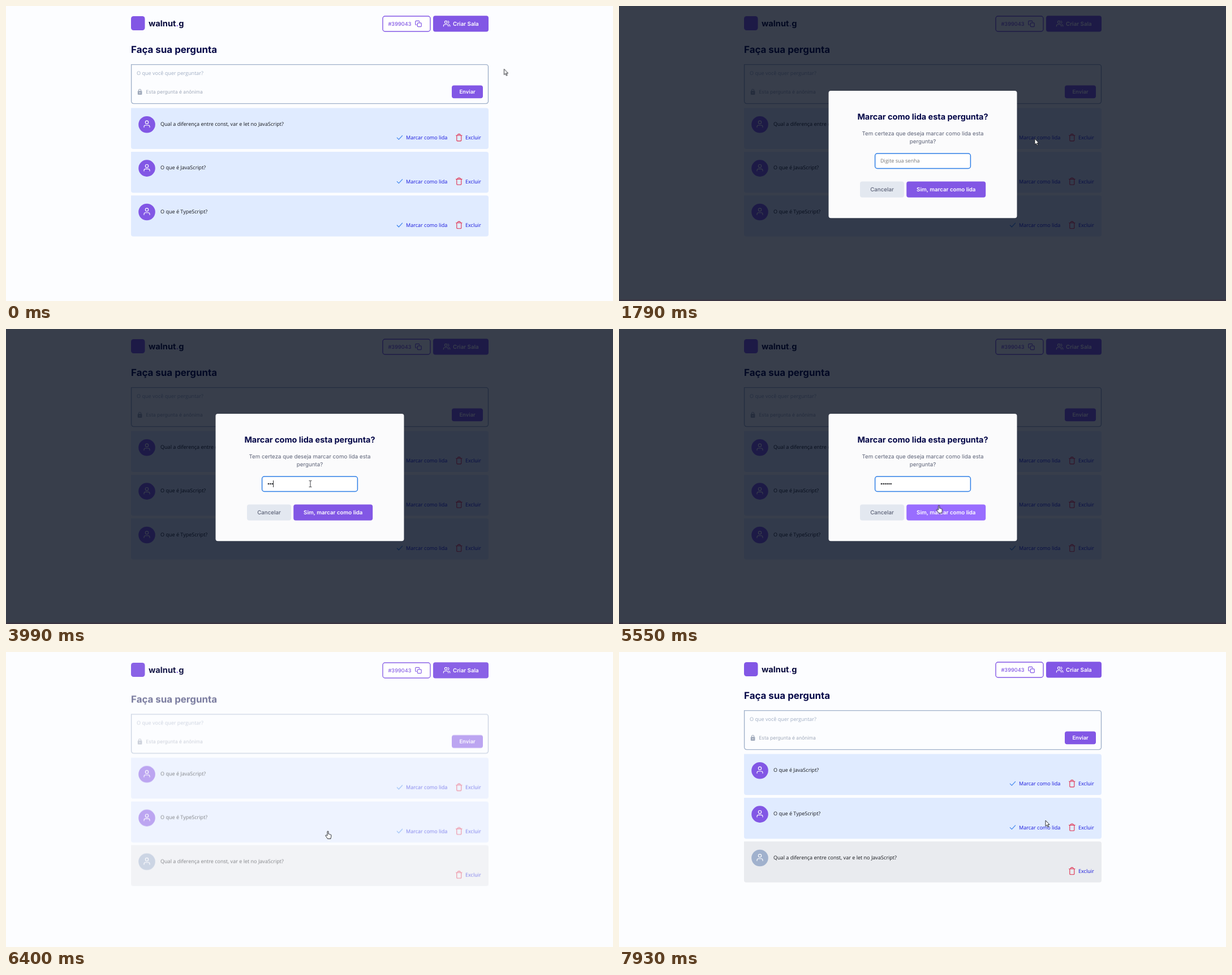
Recreate the animation shown at these times as an HTML page. Size 1073 px wide and 522 px high, loop 8 s.

```html
<!DOCTYPE html>
<html lang="pt-BR">
<head>
<meta charset="utf-8">
<title>Faça sua pergunta</title>
<style>
  html, body { margin: 0; width: 100%; height: 100%; overflow: hidden; background: #fcfdff; }
  svg { display: block; width: 100%; height: 100%; text-rendering: geometricPrecision; }

  text { font: 9.05px "Open Sans", "Noto Sans", sans-serif; }
  .ui { font-family: Inter, Roboto, sans-serif; font-size: 9.75px; font-weight: 600; }
  .mid { text-anchor: middle; }
  .title { font-size: 16.9px; font-weight: 700; fill: #040748; }
  .ask { font-size: 14.45px; font-weight: 700; fill: #040748; }
  .note { font-size: 8.6px; font-weight: 400; fill: #a3acbc; }
  .soft { font-weight: 400; fill: #5c6277; }
  .brand { font-size: 14.6px; font-weight: 700; fill: #06083b; }
  .purple { fill: #8257e5; }
  .white { fill: #fff; }
  .line { fill: none; stroke-linecap: round; stroke-linejoin: round; }
  .links { fill: #1414dc; }
  .pointer { fill: #fff; stroke: #16181d; stroke-width: .9; stroke-linejoin: round; }

  /* every part shares one 8 s clock */
  .anim { animation: 8s step-end infinite; }
  .head { animation-name: head; animation-timing-function: ease; }
  .body { animation-name: body; animation-timing-function: ease; }
  .before { animation-name: before; }
  .after { animation-name: after; }
  .hot { animation-name: hot; }
  .modal { animation-name: modal; }
  .hint { animation-name: hint; }
  .typed { animation-name: typed; }
  .caret { animation-name: caret; }
  .confirm { animation-name: confirm; }
  .cursor { animation-name: move; }
  .glow { animation-name: glow; }
  .arrow { animation-name: arrow; }
  .beam { animation-name: beam; }
  .hand { animation-name: hand; }

  @keyframes head {
    0%, 75.24% { opacity: 1; transform: none; }
    75.25% { opacity: 0; transform: translateY(14px); }
    82.25%, 100% { opacity: 1; transform: none; }
  }
  @keyframes body {
    0%, 75.24% { opacity: 1; transform: none; }
    75.25%, 77.69% { opacity: 0; transform: translateY(14px); }
    85.19%, 100% { opacity: 1; transform: none; }
  }
  @keyframes before { 0% { opacity: 1; } 75.25%, 100% { opacity: 0; } }
  @keyframes after { 0% { opacity: 0; } 75.25%, 100% { opacity: 1; } }
  @keyframes hot { 0% { fill: #1414dc; } 13.61% { fill: #f01c24; } 22.375%, 100% { fill: #1414dc; } }
  @keyframes modal { 0% { opacity: 0; } 22.375% { opacity: 1; } 75.25%, 100% { opacity: 0; } }
  @keyframes hint { 0% { opacity: 1; } 45%, 100% { opacity: 0; } }
  @keyframes typed {
    0% { transform: none; }
    45% { transform: translateX(3.35px); }
    45.875% { transform: translateX(6.7px); }
    49.875% { transform: translateX(10.05px); }
    52.75% { transform: translateX(13.4px); }
    54.875% { transform: translateX(16.75px); }
    57.75%, 100% { transform: translateX(20.1px); }
  }
  @keyframes caret {
    0% { opacity: 0; } 28.5% { opacity: 1; } 34.8% { opacity: 0; }
    41% { opacity: 1; } 64%, 100% { opacity: 0; }
  }
  @keyframes confirm { 0% { fill: #8257e5; } 68.4%, 100% { fill: #996dff; } }
  @keyframes move {
    0% { transform: translate(880.5px, 111.5px); }
    6.875% { transform: translate(880.5px, 111.5px); animation-timing-function: steps(3, start); }
    9.7625% { transform: translate(868px, 130px); animation-timing-function: steps(5, start); }
    14.575% { transform: translate(745px, 227px); animation-timing-function: steps(3, start); }
    17.4625% { transform: translate(735px, 235px); }
    27.375% { transform: translate(735px, 235px); animation-timing-function: steps(2, start); }
    29.28% { transform: translate(718px, 229px); animation-timing-function: steps(5, start); }
    34.05% { transform: translate(560px, 262px); animation-timing-function: steps(2, start); }
    35.95% { transform: translate(538px, 274px); }
    61.5% { transform: translate(538px, 274px); animation-timing-function: steps(9, start); }
    70.4% { transform: translate(569px, 317px); }
    80.5% { transform: translate(569px, 317px); animation-timing-function: steps(5, start); }
    85.625% { transform: translate(566px, 346px); animation-timing-function: steps(5, start); }
    90.4% { transform: translate(505px, 367px); animation-timing-function: steps(6, start); }
    96.25% { transform: translate(589.5px, 349px); animation-timing-function: steps(4, start); }
    100% { transform: translate(754px, 298px); }
  }
  @keyframes glow { 0% { opacity: 0; } 21.5% { opacity: 1; } 22.375%, 100% { opacity: 0; } }
  @keyframes arrow {
    0% { opacity: 1; } 13.61% { opacity: 0; } 22.375% { opacity: 1; } 33.1% { opacity: 0; }
    63.5% { opacity: 1; } 68.4% { opacity: 0; } 80.5%, 100% { opacity: 1; }
  }
  @keyframes beam { 0% { opacity: 0; } 33.1% { opacity: 1; } 63.5%, 100% { opacity: 0; } }
  @keyframes hand {
    0% { opacity: 0; } 13.61% { opacity: 1; } 22.375% { opacity: 0; }
    68.4% { opacity: 1; } 80.5%, 100% { opacity: 0; }
  }
</style>
</head>
<body>
<svg viewBox="0 0 1073 522">
  <defs>
    <radialGradient id="halo">
      <stop offset=".5" stop-color="#ffe800" stop-opacity=".7"/>
      <stop offset="1" stop-color="#ffe800" stop-opacity="0"/>
    </radialGradient>
    <path id="panel" d="M221 180.5H849a4 4 0 0 1 4 4V249a4 4 0 0 1-4 4H225a4 4 0 0 1-4-4Z"/>
    <g id="avatar">
      <circle cx="249" cy="209.7" r="14.8"/>
      <g class="line" stroke="#fff" stroke-width="1.1">
        <circle cx="249" cy="205.8" r="2.7"/>
        <path d="M244 214.6v-1.2q0-2.4 2.4-2.4h5.2q2.4 0 2.4 2.4v1.2"/>
      </g>
    </g>
    <g id="read">
      <path class="line" stroke="#3f86ee" stroke-width="1.2" d="M691.3 233.2l3 3 6.3-6.8"/>
      <text x="707" y="236.2">Marcar como lida</text>
    </g>
    <g id="del">
      <path class="line" stroke="#e02f4e" stroke-width="1.1"
        d="M795.6 229h10.4M798.6 229v-1.2q0-1.2 1.2-1.2h2q1.2 0 1.2 1.2V229M796.8 229v8.6q0 1.3 1.3 1.3h5.4q1.3 0 1.3-1.3V229"/>
      <text x="812" y="236.2">Excluir</text>
    </g>
    <g id="open">
      <use href="#panel" fill="#e0ebff"/>
      <use href="#avatar" class="purple"/>
      <use href="#del" class="links"/>
    </g>
    <g id="q-const"><text x="273" y="212" fill="#15171c">Qual a diferença entre const, var e let no JavaScript?</text></g>
    <g id="q-js"><text x="273" y="212" fill="#15171c">O que é JavaScript?</text></g>
    <g id="q-ts"><text x="273" y="212" fill="#15171c">O que é TypeScript?</text></g>
  </defs>

  <rect width="1073" height="522" fill="#fcfdff"/>

  <g class="anim head">
    <rect class="purple" x="221" y="18" width="24.5" height="25" rx="4.5"/>
    <text class="ui brand" x="252" y="35.5">walnut<tspan class="purple">.</tspan>g</text>
    <rect x="666" y="18" width="84" height="27" rx="4" fill="#fff" stroke="#8257e5" stroke-width="1.4"/>
    <text class="ui purple" x="675.5" y="34.6" style="font-size:9.2px;font-weight:500">#399043</text>
    <g class="line" stroke="#8257e5" stroke-width="1.2">
      <rect x="727.4" y="29.8" width="6.8" height="6.8" rx="1.2"/>
      <path d="M725.6 33.4h-.6q-1.2 0-1.2-1.2v-4.6q0-1.2 1.2-1.2h4.6q1.2 0 1.2 1.2v.6"/>
    </g>
    <rect class="purple" x="755" y="17.3" width="98" height="28.3" rx="4"/>
    <g class="line" stroke="#fff" stroke-width="1.1">
      <circle cx="777.6" cy="28.6" r="2.2"/>
      <path d="M773.4 36v-1q0-2.2 2.2-2.2h4q2.2 0 2.2 2.2v1M781.4 26.5a2.2 2.2 0 0 1 0 4.2M784.8 36v-1q0-1.7-1.6-2.1"/>
    </g>
    <text class="ui white" x="790" y="34.6">Criar Sala</text>
  </g>

  <g class="anim body">
    <text class="ui title" x="221" y="82.9">Faça sua pergunta</text>
    <path d="M221.6 103.6H848.5a4 4 0 0 1 4 4V168.6a4 4 0 0 1-4 4H225.6a4 4 0 0 1-4-4Z" fill="#fcfdff" stroke="#a0b1ca" stroke-width="1.4"/>
    <text x="231" y="122.2" fill="#a0aec4">O que você quer perguntar?</text>
    <rect x="232.8" y="150.3" width="7.6" height="6.6" rx="1" fill="#a0aabb"/>
    <path class="line" stroke="#a0aabb" stroke-width="1.1" d="M234.6 150.4v-1.2a2 2 0 0 1 4 0v1.2"/>
    <circle cx="236.6" cy="153.6" r=".9" fill="#fcfdff"/>
    <text class="ui note" x="247.2" y="155">Esta pergunta é anônima</text>
    <rect class="purple" x="788" y="140.6" width="55" height="22.6" rx="4"/>
    <text class="ui white mid" x="815.6" y="155.2" style="font-size:9.4px">Enviar</text>

    <g class="anim before">
      <use href="#open"/>
      <use href="#q-const"/>
      <use href="#read" class="anim hot"/>
      <g transform="translate(0 77.4)">
        <use href="#open"/><use href="#q-js"/><use href="#read" class="links"/>
      </g>
      <g transform="translate(0 154.8)">
        <use href="#open"/><use href="#q-ts"/><use href="#read" class="links"/>
      </g>
    </g>

    <g class="anim after">
      <use href="#open"/><use href="#q-js"/><use href="#read" class="links"/>
      <g transform="translate(0 77.4)">
        <use href="#open"/><use href="#q-ts"/><use href="#read" class="links"/>
      </g>
      <g transform="translate(0 154.8)">
        <use href="#panel" fill="#e9ebef"/>
        <use href="#avatar" fill="#a0b1cd"/>
        <use href="#q-const"/>
        <use href="#del" class="links"/>
      </g>
    </g>
  </g>

  <g class="anim modal">
    <rect width="1073" height="522" fill="#02091a" fill-opacity=".785"/>
    <rect y="519.5" width="1073" height="2.5" fill="#3a3442"/>
    <rect x="370.5" y="150" width="333" height="225.3" rx="4" fill="#fbfbfc"/>
    <text class="ui ask mid" x="537" y="200.8">Marcar como lida esta pergunta?</text>
    <text class="ui soft mid" x="537" y="228.6">Tem certeza que deseja marcar como lida esta</text>
    <text class="ui soft mid" x="537" y="242.6">pergunta?</text>
    <rect x="452.6" y="261" width="168.8" height="26.4" rx="4" fill="#fff" stroke="#2f7fe6" stroke-width="1.5"/>
    <g fill="#14161a">
      <circle cx="463.9" cy="274" r="1.2"/>
      <circle cx="467.25" cy="274" r="1.2"/>
      <circle cx="470.6" cy="274" r="1.2"/>
      <circle cx="473.95" cy="274" r="1.2"/>
      <circle cx="477.3" cy="274" r="1.2"/>
      <circle cx="480.65" cy="274" r="1.2"/>
    </g>
    <g class="anim typed">
      <rect x="462.2" y="268" width="24" height="12" fill="#fff"/>
      <rect class="anim caret" x="462" y="268" width=".9" height="12" fill="#14161a"/>
    </g>
    <text class="anim hint" x="462" y="277.3" fill="#757575">Digite sua senha</text>
    <rect x="426" y="310.6" width="78" height="28.2" rx="4" fill="#e3e8f0"/>
    <text class="ui soft mid" x="465" y="328" style="font-weight:500">Cancelar</text>
    <rect class="anim confirm" x="508.2" y="310.6" width="140" height="28.2" rx="4"/>
    <text class="ui white mid" x="578.3" y="328">Sim, marcar como lida</text>
  </g>

  <g class="anim cursor">
    <circle class="anim glow" cx="0" cy="2.5" r="8" fill="url(#halo)"/>
    <path class="anim arrow pointer" d="M0 0V10.2L2.4 8 4 11.8 5.6 11.1 4 7.4H7Z"/>
    <path class="anim beam line" stroke="#26282d" stroke-width=".9" d="M-2-5.5h1.4L0-5 .6-5.5H2M0-5V5M-2 5.5h1.4L0 5l.6.5H2"/>
    <path class="anim hand pointer" d="M-1 8V1a1 1 0 0 1 2 0V5.2q.9-.7 1.6.3 1-.5 1.6.5 1.6-.2 1.6 1.2v2.6q0 1-.8 2.2v1.5H-.6Q-1 12-3.6 9q-1-1.6 0-2Q-2.6 6.7-1 8Z"/>
  </g>
</svg>
</body>
</html>
```
